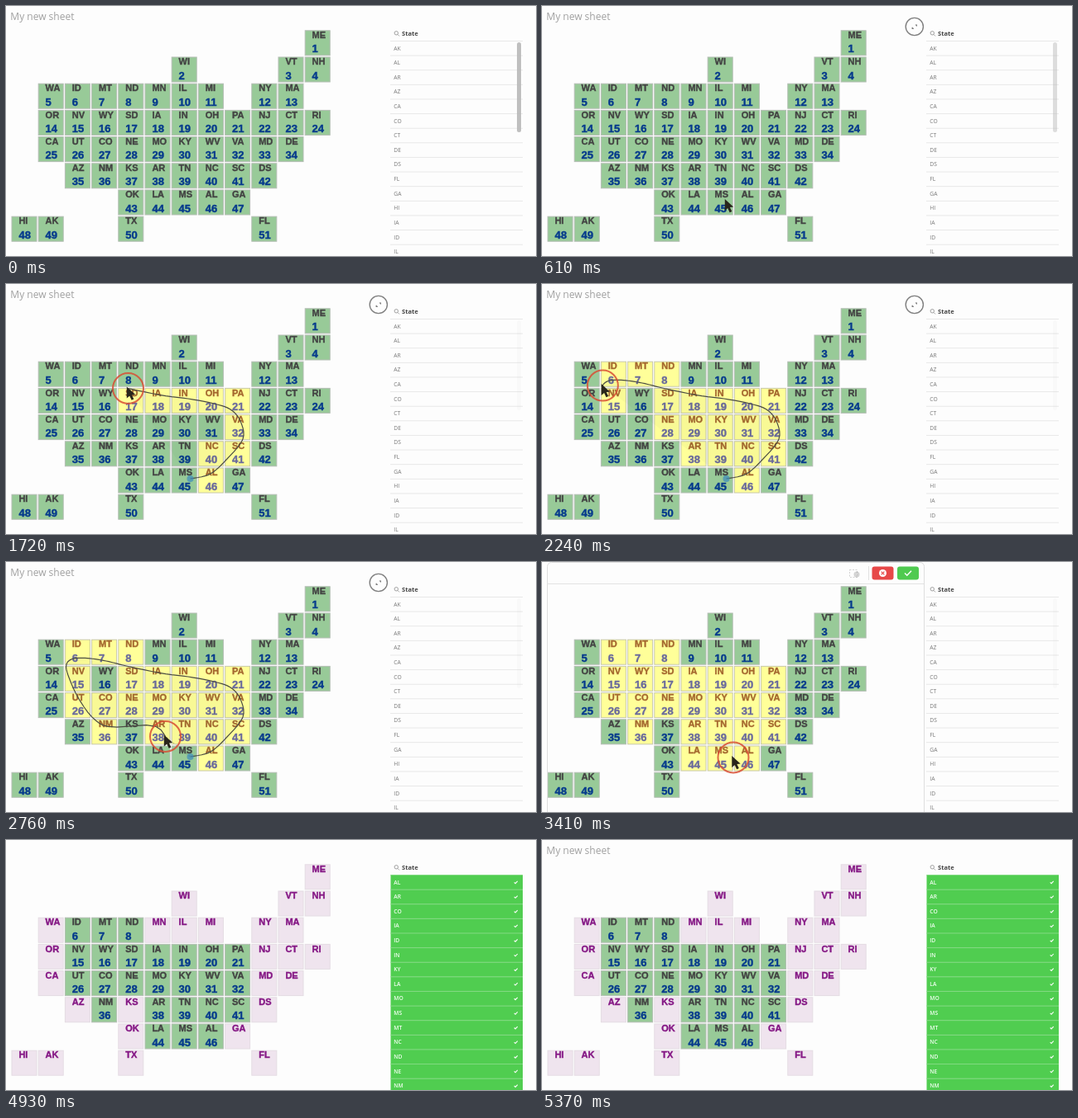
An HTML page with a canvas that plays this animation: 640x303 px, repeating every 6.33 s.

```html
<!DOCTYPE html>
<html lang="en">
<head>
<meta charset="utf-8">
<title>Lasso selection on a tile map</title>
<style>
  html, body { margin: 0; width: 100%; height: 100%; overflow: hidden; background: #fdfdfd; }
  canvas { display: block; width: 640px; height: 303px; }
</style>
</head>
<body>
<canvas id="stage"></canvas>
<script>
const LOOP = 6330, STEP = 130, PITCH = 32.2, ROW = 17.62;
const TIMES = { press: 770, release: 3150, confirm: 4800, title: 5240 };
const MAP_FONT = 'Liberation Sans, Arial, sans-serif';
const UI_FONT = 'Open Sans, Noto Sans, sans-serif';

const MAP_ROWS = [
  '......................ME',
  '............WI......VTNH',
  '..WAIDMTNDMNILMI..NYMA..',
  '..ORNVWYSDIAINOHPANJCTRI',
  '..CAUTCONEMOKYWVVAMDDE..',
  '....AZNMKSARTNNCSCDS....',
  '........OKLAMSALGA......',
  'HIAK....TX........FL....'
];
const tiles = MAP_ROWS.flatMap((row, r) =>
  row.match(/../g).map((state, c) => ({ state, x: 7 + c * PITCH, y: 29.8 + r * PITCH }))
).filter(tile => tile.state !== '..');

// The lasso picks up one group of states per time step.
const selectedAt = {};
'AL,,NC SC,VA,PA,OH IN,IA,SD,ND TN WV KY,MT MO,ID AR,NV NE,,UT,CO NM,,,LA,MS WY'
  .split(',').forEach((group, i) =>
    group.split(' ').forEach(state => { if (state) selectedAt[state] = 810 + i * STEP; }));

const ALL_STATES = 'AK AL AR AZ CA CO CT DE DS FL GA HI IA ID IL'.split(' ');
const CHOSEN = 'AL AR CO IA ID IN KY LA MO MS MT NC ND NE NM'.split(' ');

// Pointer drag: time, x, y
const DRAG = [
  [770, 222.5, 236], [900, 246, 230.5], [1050, 266, 213], [1150, 286, 188],
  [1250, 283, 166], [1330, 271, 152], [1430, 251, 145], [1530, 220, 139],
  [1620, 189, 135], [1720, 147.5, 126.5], [1870, 121, 120], [2020, 97, 116.5],
  [2150, 80, 117.5], [2260, 72.8, 125], [2370, 76, 140], [2480, 88, 166],
  [2560, 106, 190], [2640, 127, 200], [2700, 176, 198], [2760, 192.5, 211.5],
  [2890, 196, 230], [3020, 214, 241], [3150, 231, 237]
];

const canvas = document.getElementById('stage');
const ctx = canvas.getContext('2d');
const scale = window.devicePixelRatio || 1;
canvas.width = 640 * scale;
canvas.height = 303 * scale;

const clamp = v => Math.max(0, Math.min(1, v));
const ramp = (t, from, to) => clamp((t - from) / (to - from));
const mix = (a, b, k) => a + (b - a) * k;

function dragPoint(t) {
  const last = DRAG.length - 1;
  let i = 0;
  while (i < last - 1 && DRAG[i + 1][0] <= t) i++;
  const [p0, p1, p2, p3] = [i - 1, i, i + 1, i + 2].map(n => DRAG[Math.max(0, Math.min(last, n))]);
  const k = ramp(t, p1[0], p2[0]);
  return [1, 2].map(a => p1[a] + 0.5 * k * (p2[a] - p0[a] +
    k * (2 * p0[a] - 5 * p1[a] + 4 * p2[a] - p3[a] +
    k * (3 * (p1[a] - p2[a]) + p3[a] - p0[a]))));
}

function text(str, x, y, font, color) {
  ctx.font = font;
  ctx.fillStyle = color;
  ctx.fillText(str, x, y);
}

function heavyText(str, x, y, size, color) {
  text(str, x, y, `bold ${size}px ${MAP_FONT}`, color);
  ctx.strokeStyle = color;
  ctx.lineWidth = 0.4;
  ctx.strokeText(str, x, y);
}

function stroke(points, color, width = 1) {
  ctx.beginPath();
  points.forEach(([x, y]) => ctx.lineTo(x, y));
  ctx.strokeStyle = color;
  ctx.lineWidth = width;
  ctx.stroke();
}

function ring(x, y, r, color, width) {
  ctx.beginPath();
  ctx.arc(x, y, r, 0, 7);
  ctx.strokeStyle = color;
  ctx.lineWidth = width;
  ctx.stroke();
}

function pill(x, y, w, h, r, color) {
  ctx.beginPath();
  ctx.roundRect(x, y, w, h, r);
  ctx.fillStyle = color;
  ctx.fill();
}

function faded(alpha, draw) {
  if (alpha <= 0) return;
  ctx.save();
  ctx.globalAlpha = alpha;
  draw();
  ctx.restore();
}

const check = (x, y, size, width) =>
  stroke([[x - size, y], [x - size * 0.3, y + size * 0.7], [x + size, y - size * 0.7]], '#fff', width);

const LOOKS = {
  normal: { fill: '#98ca98', edge: '#b3bdb3', label: '#434343', number: '#053a8c' },
  picked: { fill: '#ffff99', edge: '#c9c9a8', label: '#a5682f', number: '#6a6a9c' },
  excluded: { fill: '#efe4ee', edge: '#e4dce3', label: '#851885' }
};

function drawTile({ state, x, y }, number, look) {
  ctx.fillStyle = look.fill;
  ctx.fillRect(x, y, 30, 30);
  ctx.strokeStyle = look.edge;
  ctx.lineWidth = 1;
  ctx.strokeRect(x, y, 30, 30);
  heavyText(state, x + 8.4, y + 9.2, 11, look.label);
  if (look.number) heavyText(number, x + 8.4, y + 26.6, 13, look.number);
}

function drawMap(t) {
  tiles.forEach((tile, i) => {
    const chosen = tile.state in selectedAt;
    const picked = chosen && t >= selectedAt[tile.state];
    const done = t >= TIMES.confirm;
    const look = done ? (chosen ? 'normal' : 'excluded') : picked ? 'picked' : 'normal';
    drawTile(tile, i + 1, LOOKS[look]);
  });
}

function drawLasso(t) {
  const trail = [];
  for (let s = TIMES.press; s < t; s += 20) trail.push(dragPoint(s));
  trail.push(dragPoint(t));
  stroke(trail, '#4c4c44', 1.2);
  ctx.fillStyle = 'rgba(30, 60, 30, .03)';
  ctx.fill();

  // A dotted line offers to close the loop once the pointer is near its start.
  const [x0, y0] = trail[0], [x, y] = trail[trail.length - 1];
  if (Math.hypot(x - x0, y - y0) < 60) {
    ctx.setLineDash([2, 3]);
    stroke([[x0, y0], [x, y]], 'rgba(70, 70, 60, .5)');
    ctx.setLineDash([]);
  }
  pill(x0 - 4, y0 - 4, 8, 8, 4, 'rgba(60, 140, 190, .7)');
}

function drawPointer(t, dragTime) {
  let [x, y] = dragPoint(dragTime);
  if (t < 610) y += t < 350 ? 4 : 20;
  if (t >= TIMES.press) ring(x, y, 18.5, 'rgba(217, 78, 52, .85)', 2);
  ctx.save();
  ctx.translate(x - 1.7, y - 2);
  ctx.scale(0.9, 0.9);
  ctx.beginPath();
  [[0, 0], [0, 15.5], [3.8, 12.2], [6.5, 18], [9.5, 16.6], [6.8, 11], [11.5, 10.6]]
    .forEach(([px, py]) => ctx.lineTo(px, py));
  ctx.closePath();
  ctx.fillStyle = '#29251c';
  ctx.fill();
  ctx.restore();
}

function drawExpandButton() {
  ring(449.8, 25, 10.6, '#808080', 1.4);
  stroke([[450.8, 23], [452.4, 23], [452.4, 24.6]], '#777', 1.2);
  stroke([[447.2, 25.8], [447.2, 27.4], [448.8, 27.4]], '#777', 1.2);
}

function drawToolbar(t) {
  ctx.beginPath();
  ctx.roundRect(6.5, 0.5, 455, 320, 5);
  ctx.strokeStyle = '#dedede';
  ctx.lineWidth = 1;
  ctx.stroke();
  stroke([[7, 26.5], [461, 26.5]], '#e2e2e2');
  stroke([[394.5, 5], [394.5, 22]], '#e2e2e2');
  faded(mix(0.25, 1, ramp(t, 3740, 4000)), () => {
    ctx.setLineDash([2, 1.5]);
    ctx.strokeStyle = '#555';
    ctx.strokeRect(371.5, 9.5, 9, 9);
    ctx.setLineDash([]);
    pill(376.5, 11.5, 7, 7, 3.5, '#555');
    stroke([[378.5, 13.5], [381.5, 16.5]], '#fff');
    stroke([[381.5, 13.5], [378.5, 16.5]], '#fff');
  });
  pill(398.5, 5.5, 26, 16, 3, '#e74848');
  pill(429, 5.5, 26, 16, 3, '#4fca50');
  pill(407, 9, 9, 9, 4.5, '#fff');
  stroke([[409.6, 11.6], [413.4, 15.4]], '#e74848', 1.2);
  stroke([[413.4, 11.6], [409.6, 15.4]], '#e74848', 1.2);
  check(442, 13.5, 4, 1.4);
}

function drawList(t) {
  ring(471.3, 32.8, 2.2, '#888', 0.8);
  stroke([[473, 34.5], [475, 36.5]], '#888', 0.8);
  text('State', 478, 36.2, `bold 7.5px ${UI_FONT}`, '#444');
  const top = 42.5;
  ALL_STATES.forEach((state, i) => {
    const y = top + i * ROW;
    stroke([[464, y], [624, y]], '#e8e8e8');
    text(state, 468.3, y + 11, `6.7px ${UI_FONT}`, '#777');
  });
  faded(mix(0.9, 0.06, ramp(t, 300, 900)), () => pill(617, 44, 5, 109, 2.5, '#b8b8b8'));
  faded(ramp(t, 3600, 3900), () => CHOSEN.forEach((state, i) => {
    const y = top + i * ROW;
    ctx.fillStyle = '#50cd50';
    ctx.fillRect(464.5, y, 159.5, ROW);
    stroke([[464.5, y], [624, y]], '#82da82');
    text(state, 468.3, y + 11, `600 6.7px ${UI_FONT}`, '#f2fff2');
    check(615.7, y + 8.8, 2, 1.1);
  }));
}

function draw(t) {
  const stepped = 1200 + Math.floor((t - 1200) / STEP) * STEP;
  const dragTime = Math.max(stepped, TIMES.press);
  ctx.setTransform(scale, 0, 0, scale, 0, 0);
  ctx.fillStyle = '#fdfdfd';
  ctx.fillRect(0, 0, 640, 303);

  const toolbar = t >= TIMES.release && t < TIMES.confirm;
  if (t < TIMES.release || t >= TIMES.title) {
    text('My new sheet', 5.3, 17, `12px ${UI_FONT}`, '#a0a0a0');
  }
  drawMap(t);
  if (toolbar) faded(mix(0.4, 1, ramp(t, TIMES.release, 3410)), () => drawToolbar(t));
  if (t < TIMES.release) faded(ramp(t, 50, 250), drawExpandButton);
  drawList(t);
  if (t >= TIMES.press && t < TIMES.release) drawLasso(dragTime);
  if (t >= 100 && t < 3740) drawPointer(t, dragTime);
}

const start = performance.now();
function frame() {
  draw((performance.now() - start) % LOOP);
  requestAnimationFrame(frame);
}
frame();
</script>
</body>
</html>
```
